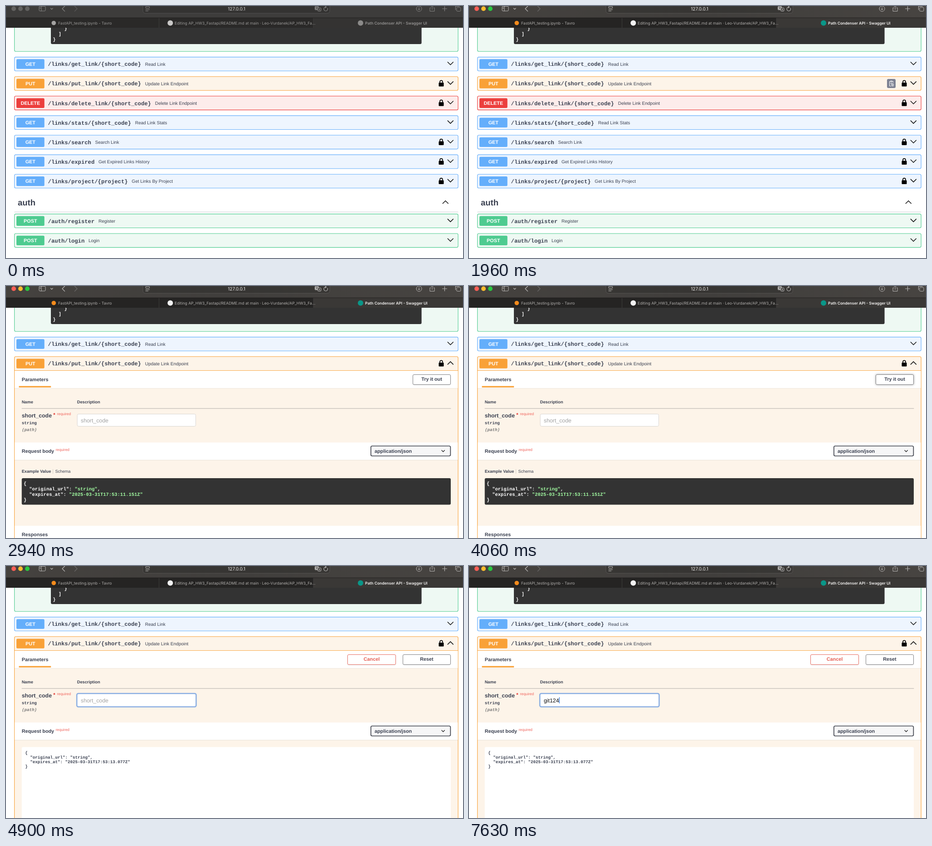
Write an HTML page that moves like this. It is 1008 px wide and 556 px high and loops after 8000 ms.

```html
<!DOCTYPE html>
<html lang="en">
<head>
<meta charset="utf-8">
<title>API docs walkthrough</title>
<style>
html, body { margin: 0; width: 100%; height: 100%; overflow: hidden; background: #fff; }
#stage { position: relative; width: 1008px; height: 556px; overflow: hidden; }
svg { position: absolute; left: 0; top: 0; }
text, .btn { font-family: "Liberation Sans", Arial, sans-serif; text-rendering: geometricPrecision; white-space: pre; }
text { fill: #3b4151; }
.b { font-weight: 700; }
.mono { font-family: "Liberation Mono", "Courier New", monospace; font-weight: 700; }
.ui { font-family: Inter, Roboto, sans-serif; }
.line { fill: none; stroke-linecap: round; stroke-linejoin: round; }

/* Scene switches on the 8 s timeline */
.idle, .active, .closed, .open, .example, .editing, .focus, .hint, .typed, .try { animation: 8s step-end infinite; }
.idle { animation-name: until-active; }
.active { animation-name: from-active; }
.closed { animation-name: until-open; }
.open { animation-name: from-open; }
.example, .try { animation-name: while-example; }
.editing { animation-name: from-editing; }
.focus { animation-name: from-focus; }
.hint { animation-name: until-typed; }
.typed { animation-name: from-typed; }
@keyframes until-active { 19.2% { opacity: 0; } }
@keyframes from-active { 0% { opacity: 0; } 19.2% { opacity: 1; } }
@keyframes until-open { 27.1% { opacity: 0; } }
@keyframes from-open { 0% { opacity: 0; } 27.1% { opacity: 1; } }
@keyframes while-example { 0% { opacity: 0; } 27.1% { opacity: 1; } 52.45% { opacity: 0; } }
@keyframes from-editing { 0% { opacity: 0; } 52.45% { opacity: 1; } }
@keyframes from-focus { 0% { opacity: 0; } 61.2% { opacity: 1; } }
@keyframes until-typed { 82.2% { opacity: 0; } }
@keyframes from-typed { 0% { opacity: 0; } 82.2% { opacity: 1; } }

.caret { animation: caret 8s linear infinite; }
@keyframes caret {
  0%, 82.15% { opacity: 0; }
  82.2%, 88.75% { opacity: 1; }
  90.1%, 93.1% { opacity: 0; }
  95.3%, 100% { opacity: 1; }
}

.copy { position: absolute; top: 161px; height: 20px; overflow: hidden; border-radius: 3px; background: #7d8293; animation: copy 8s ease infinite; }
.copy svg { left: 50%; margin-left: -9.5px; }
@keyframes copy {
  0%, 18.75% { width: 0; right: 62px; }
  24.4%, 31% { width: 19px; right: 67px; }
  36.7%, 44.1% { width: 0; right: 62px; }
  46.3%, 47.6% { width: 11px; right: 65px; }
  50.7%, 100% { width: 0; right: 62px; }
}

.btn {
  position: absolute; top: 194.5px; height: 23px; box-sizing: border-box;
  border: 1.6px solid #808083; border-radius: 3px; background: #fff;
  box-shadow: 0 1px 2px rgba(0,0,0,.1); color: #3b4151;
  font-size: 10.8px; font-weight: 700; line-height: 20px; text-align: center;
}
.try { left: 897px; width: 84px; animation: while-example 8s step-end infinite, hover 8s ease infinite; }
.cancel { left: 753px; animation: from-editing 8s step-end infinite, cancel 8s ease-out infinite; }
.reset { right: 27px; animation: from-editing 8s step-end infinite, reset 8s ease-out infinite; }
@keyframes hover {
  0%, 48% { box-shadow: 0 1px 2px rgba(0,0,0,.1); }
  50.7%, 100% { box-shadow: 0 0 5px rgba(0,0,0,.35); }
}
@keyframes cancel {
  0%, 52.5% { width: 75px; border-color: #8f6a60; color: #54413f; box-shadow: 0 0 5px rgba(0,0,0,.3); }
  56.8%, 100% { width: 107px; border-color: #e86d62; color: #e55e53; box-shadow: 0 1px 2px rgba(0,0,0,.1); }
}
@keyframes reset {
  0%, 52.5% { width: 138.5px; }
  56.8%, 100% { width: 106px; }
}
</style>
</head>
<body>
<div id="stage">
  <svg id="page" width="1008" height="556" viewBox="0 0 1008 556"></svg>
  <div class="copy">
    <svg width="19" height="20" fill="none" stroke="#fff" stroke-width="1">
      <path d="M13.5 8V5.5h-8v10h3.5M7.5 5.5v-1h4v1M7.5 8.5h4M7.5 11h2M14.5 15.5h-4v-5h4M15.5 13h-3.5m1.5-1.5L12 13l1.5 1.5"/>
    </svg>
  </div>
  <div class="btn try">Try it out</div>
  <div class="btn cancel">Cancel</div>
  <div class="btn reset">Reset</div>
</div>
<script>
const COLORS = {
  GET: ['#64aefb', '#eef5fe'],
  PUT: ['#f9a137', '#fdf4e9'],
  DELETE: ['#ec3f3d', '#fdeceb'],
  POST: ['#4ecb90', '#eef9f3'],
};
const INK = '#3b4151';

// cy is the optical middle of the capitals
const text = (x, cy, size, str, cls = '', attrs = '') =>
  `<text x="${x}" y="${cy + size * 0.36}" font-size="${size}" class="${cls}" ${attrs}>${str}</text>`;
const fill = color => `style="fill:${color}"`;
const rect = (x, y, w, h, color, r = 0, attrs = '') =>
  `<rect x="${x}" y="${y}" width="${w}" height="${h}" rx="${r}" fill="${color}" ${attrs}/>`;
const line = (d, color, w = 1, attrs = '') =>
  `<path class="line" d="${d}" stroke="${color}" stroke-width="${w}" ${attrs}/>`;
const dot = (x, y, r, color) => `<circle cx="${x}" cy="${y}" r="${r}" fill="${color}"/>`;
const group = (cls, ...parts) => `<g class="${cls}">${parts.join('')}</g>`;
const chevron = (x, y, up) =>
  line(`M${x - 6} ${y + (up ? 3 : -3)}l6 ${up ? -6 : 6}l6 ${up ? 6 : -6}`, '#111', 1.5);
const lock = (x, y) =>
  rect(x - 5.5, y - 1.5, 11, 8.5, '#000', 1.3) +
  line(`M${x - 3} ${y - 1}v-2.3a3 3 0 0 1 6 0v2.3`, '#000', 1.7);

function summary(cy, method, path, note, locked, up) {
  const noteX = 93 + path.length * 7.34 + 8.2;
  return rect(23, cy - 10.7, 61.7, 21.4, COLORS[method][0], 2.5) +
    text(53.8, cy, 10.8, method, 'b', 'text-anchor="middle" style="fill:#fff"') +
    text(92.6, cy, 12.22, path, 'mono') +
    text(noteX, cy, 10, note) +
    (locked ? lock(960, cy - 0.5) : '') +
    chevron(980.3, cy - 1.2, up);
}

function row(cy, method, ...rest) {
  const [main, tint] = COLORS[method];
  return rect(18.6, cy - 15.4, 978.6, 30.6, tint, 3, `stroke="${main}" stroke-width="1.1"`) +
    summary(cy, method, ...rest);
}

function bar(on) {
  const glyph = on ? '#b9b7b5' : '#858483';
  const dim = on ? '#6a6866' : '#5a5958';
  const label = on ? '#b0aeac' : '#999897';
  const lights = on ? ['#ff5f57', '#febc2e', '#2ac840'] : ['#636261', '#636261', '#636261'];
  const marks = on ? ['#f38b1c', '#f2f2f2', '#0a9688'] : ['#a3a2a1', '#c9c8c7', '#8b8a89'];
  return group(on ? 'active' : 'idle',
    rect(0, 0, 1008, 26, on ? 'url(#barOn)' : '#3d3c3b'),
    rect(0, 26, 678, 22, on ? '#252423' : '#2a2928'),
    rect(678, 26, 330, 22, on ? '#3a3836' : '#343332'),
    line('M0 26H1008', '#1c1b1a', 0.8),
    line('M337.5 27V48M678 27V48', '#454442', 0.8),
    lights.map((c, i) => dot(17 + 15 * i, 6, 5, c)).join(''),
    // sidebar and navigation
    rect(73, 0.5, 14, 10.5, 'none', 2, `stroke="${glyph}"`),
    line('M78 1V11M74.8 3.5h1.4M74.8 5.5h1.4', glyph),
    line('M98.5 5l2.3 2.4l2.3-2.4', glyph, 1.3),
    line('M129.5 0.5l-5.5 5.5l5.5 5.5', glyph, 1.3),
    line('M151.5 0.5l5.5 5.5l-5.5 5.5', dim, 1.3),
    // address field
    rect(302, -8, 412, 24, 'rgba(0,0,0,.15)', 5, 'stroke="rgba(255,255,255,.12)"'),
    rect(308, 1, 8.5, 4, 'none', 1, `stroke="${glyph}"`),
    line('M308 8h8.5M308 11h5.5', glyph),
    text(508.5, 6.2, 10.2, '127.0.0.1', 'ui', `text-anchor="middle" ${fill(on ? '#ecebea' : '#d2d1d0')}`),
    rect(681, 0.5, 9, 8.5, glyph, 2),
    text(685.5, 4.8, 7, '文', '', 'text-anchor="middle" style="fill:#333;font-family:\'Noto Sans CJK SC\',sans-serif"'),
    rect(687.5, 4, 7.5, 7.5, '#3d3c3b', 2, `stroke="${glyph}"`),
    text(691.2, 7.8, 6, 'A', 'b', `text-anchor="middle" ${fill(glyph)}`),
    line('M709 4.5a4.3 4.3 0 1 1-3-2.1M704.5 0.2l2 2.2l-2.2 1.8', glyph, 1.1),
    // right-hand tools
    line('M905 6a6 6 0 1 0 12 0a6 6 0 1 0-12 0M911 3v5.5M908.7 6.5l2.3 2.3l2.3-2.3', glyph),
    line('M937 4h-2v7.5h10V4h-2M940 8V-1M937.5 1l2.5-2.5l2.5 2.5', glyph),
    line('M962.5 6h10M967.5 1v10', glyph, 1.2),
    rect(994, 3, 9, 8.5, 'none', 1.5, `stroke="${glyph}"`),
    line('M991.5 8.5V0.5H1000', glyph),
    // tabs
    dot(105.3, 37.5, 4.8, marks[0]),
    text(115, 37.6, 8.6, 'FastAPI_testing.ipynb - Tavro', 'ui', fill(label)),
    dot(362.3, 37.5, 6, marks[1]),
    text(372, 37.6, 8.6, 'Editing AP_HW3_Fastapi/README.md at main · Leo-Vurdanek/AP_HW3_Fa…', 'ui', fill(label)),
    dot(782, 37.5, 6, marks[2]),
    text(792, 37.6, 8.5, 'Path Condenser API - Swagger UI', 'ui',
      `font-weight="${on ? 600 : 500}" ${fill(on ? '#f4f3f2' : '#a09f9e')}`));
}

const brace = (x, cy, s) => text(x, cy, 10.45, s, 'mono', fill('#fff'));
const pair = (cy, key, value, tail) =>
  brace(51.3, cy, `"${key}": <tspan style="fill:#a2fca2">"${value}"</tspan>${tail}`);
const required = (x, cy) => text(x, cy, 8.3, 'required', '', fill('#f0625a'));
const strip = y => rect(19.2, y, 977.4, 38.3, '#fff', 0, 'filter="url(#soft)"');

const previous =
  rect(18.6, 20, 978.6, 80.2, COLORS.POST[1], 3, `stroke="${COLORS.POST[0]}" stroke-width="1.1"`) +
  rect(99, 20, 817.6, 64, '#333', 3) +
  brace(128.4, 49, '}') + brace(115.8, 61, ']') + brace(103.3, 73.2, '}');

const list = [
  ['DELETE', '/links/delete_link/{short_code}', 'Delete Link Endpoint', true],
  ['GET', '/links/stats/{short_code}', 'Read Link Stats', false],
  ['GET', '/links/search', 'Search Link', true],
  ['GET', '/links/expired', 'Get Expired Links History', true],
  ['GET', '/links/project/{project}', 'Get Links By Project', true],
];
const put = ['PUT', '/links/put_link/{short_code}', 'Update Link Endpoint', true];

const closed = group('closed',
  row(171.1, ...put),
  list.map((item, i) => row(214.2 + 43.1 * i, ...item)).join(''),
  text(26, 433.5, 18.46, 'auth', 'b'),
  chevron(969.3, 432.7, true),
  line('M19 454.5H997', '#c4c6cb', 0.9),
  row(474.3, 'POST', '/auth/register', 'Register', false),
  row(517.4, 'POST', '/auth/login', 'Login', false));

const example = group('example',
  text(34.7, 409, 9.23, 'Example Value', 'b'),
  line('M103.5 404.5V414', '#c9c4be', 0.8),
  text(108.5, 409, 9.23, 'Schema'),
  rect(34.7, 424, 946.3, 58.4, '#333', 3),
  brace(39, 435, '{'),
  pair(447, 'original_url', 'string', ','),
  pair(459.2, 'expires_at', '2025-03-31T17:53:11.151Z', ''),
  brace(39, 471.4, '}'),
  strip(529),
  text(34.7, 548, 10.8, 'Responses', 'b'));

const body = (x, cy, s) => text(x, cy, 9.2, s, 'mono');
const editing = group('editing',
  rect(34.7, 399.5, 946.3, 170, '#fff', 3),
  body(42.3, 411.5, '{'),
  body(53.3, 421.4, '"original_url": "string",'),
  body(53.3, 431.4, '"expires_at": "2025-03-31T17:53:13.077Z"'),
  body(42.3, 441.5, '}'));

const input =
  rect(157.2, 282.5, 261.3, 27, '#fff', 3, 'stroke="#d9d6d2" stroke-width="1"') +
  group('focus', rect(156.2, 281.2, 263.2, 29.6, '#fff', 3.5, 'stroke="#8cafe2" stroke-width="2.6"')) +
  group('hint', text(165, 296.2, 12.3, 'short_code', '', fill('#a2a2a2'))) +
  group('typed', text(165, 296.2, 12.3, 'git124', '', fill('#111'))) +
  rect(198.7, 289.5, 1.3, 13.5, '#2f74d8', 0, 'class="caret"');

const open = group('open',
  rect(18.6, 155.7, 978.6, 420, COLORS.PUT[1], 3, `stroke="${COLORS.PUT[0]}" stroke-width="1.1"`),
  strip(187),
  line('M19 186.5H997', COLORS.PUT[0], 0.9),
  summary(171.1, ...put, true),
  text(34.7, 206.2, 10.8, 'Parameters', 'b'),
  rect(28.5, 220.7, 70.7, 3.1, COLORS.PUT[0]),
  text(34.7, 255.2, 9.23, 'Name', 'b'),
  text(156.8, 255.2, 9.23, 'Description', 'b'),
  line('M35 270.2H981', '#a9a5a3', 0.9),
  text(34.7, 285.2, 12.3, 'short_code', 'b'),
  text(104.3, 284, 11.5, '*', 'b', fill('#e0342f')),
  required(112.6, 282),
  text(34.7, 301.5, 9.2, 'string', 'mono'),
  text(35, 316.5, 9.2, '(path)', 'mono', 'font-style="italic" style="fill:#777"'),
  input,
  strip(345.3),
  text(34.7, 364.2, 10.8, 'Request body', 'b'),
  required(109.5, 360.7),
  rect(804.8, 353, 175.6, 22, '#f6f6f7', 3, 'stroke="#41444e" stroke-width="1.7"'),
  text(813, 364.2, 10.8, 'application/json', 'b'),
  line('M961 362.5l3.2 3.2l3.2-3.2', '#222', 1.3),
  example, editing);

document.getElementById('page').innerHTML = `
  <defs>
    <linearGradient id="barOn">
      <stop offset="0" stop-color="#45423f"/>
      <stop offset=".5" stop-color="#403e3c"/>
      <stop offset="1" stop-color="#474441"/>
    </linearGradient>
    <filter id="soft" x="-1%" y="-20%" width="102%" height="150%">
      <feDropShadow dx="0" dy=".8" stdDeviation=".7" flood-opacity=".12"/>
    </filter>
  </defs>` +
  previous +
  row(128, 'GET', '/links/get_link/{short_code}', 'Read Link', false) +
  closed + open + bar(false) + bar(true);
</script>
</body>
</html>
```
